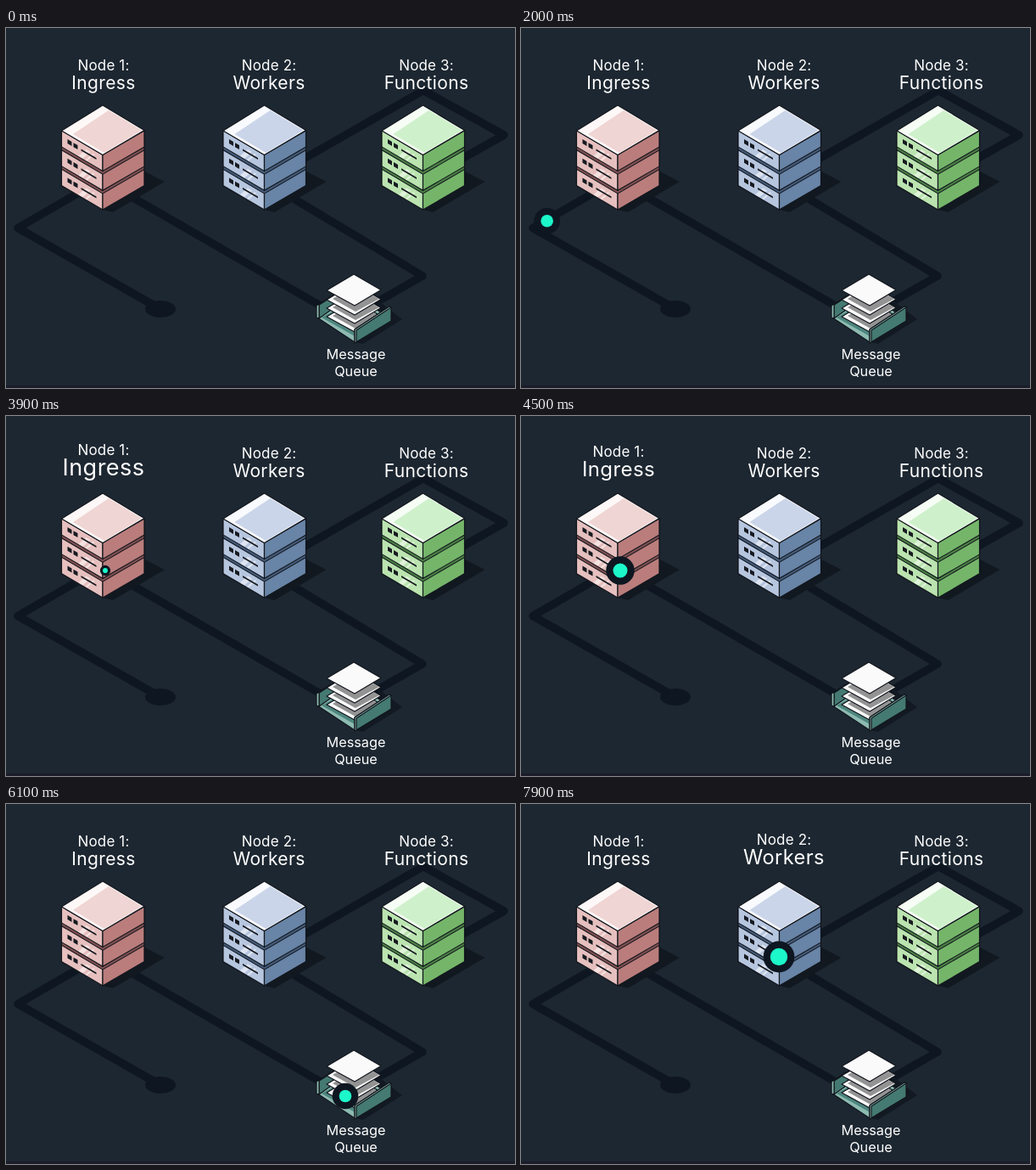
These frames come from a looping animation (600 by 424 pixels, 8 s). An HTML page:

```html
<!DOCTYPE html>
<html lang="en">
<head>
<meta charset="utf-8">
<title>Message flow</title>
<style>
  html, body { margin: 0; width: 100%; height: 100%; overflow: hidden; background: #1d2731; }
  svg { display: block; width: 600px; height: 424px; }
  text { font-family: Inter, "Open Sans", sans-serif; fill: #fff; text-anchor: middle; }
  .small { font-size: 17px; letter-spacing: .15px; }
  .name { font-size: 21px; letter-spacing: .35px; }
  .queue { font-size: 16.3px; }
  .edge { stroke: #11151c; stroke-width: 1.2; stroke-linejoin: round; }
</style>
</head>
<body>
<svg viewBox="0 0 600 424">
  <rect width="600" height="424" fill="#1d2731"/>
  <rect y="421" width="600" height="3" fill="#1b1d2a"/>
  <g fill="none" stroke="#0e1721" stroke-width="9.5" stroke-linejoin="round">
    <path d="M182 331L14 235.500L117 176"/>
    <path d="M117 181L400 344L491 292L304 180"/>
    <path d="M304 181L492 73.500L587 126L491 180"/>
  </g>
  <ellipse cx="182" cy="331" rx="18" ry="10" fill="#0e1721"/>
  <g id="nodes"></g>
  <g id="queue">
    <path d="M440 322L467 343L421 372L411 370Z" fill="#121922"/>
    <g class="edge">
      <path d="M367 341L411 315L453 342L411 370Z" fill="#8dbab1"/>
      <path d="M372 341L411 319L446 341L411 363Z" fill="#4d867e" stroke="none"/>
      <path d="M369 326L386 315L386 330L369 342Z" fill="#447a72"/>
      <path d="M366 327L383 316L386 315L369 326L369 342L366 341Z" fill="#8fbdb4"/>
      <g id="sheets"></g>
      <path d="M411 355L452 328L454 329L454 345L411 371Z" fill="#447a72"/>
      <path d="M411 355L452 328L454 329L413 356L413 370L411 371Z" fill="#8fbdb4"/>
    </g>
  </g>
  <text class="queue" x="412.500" y="390">Message</text>
  <text class="queue" x="412.500" y="410">Queue</text>
  <g id="dot">
    <circle id="halo" fill="#0e1721"/>
    <circle id="core" fill="#1cf8ca"/>
  </g>
</svg>
<script>
const $ = id => document.getElementById(id);
const LOOP = 8000;

const NODES = [
  { x: 114, labelX: 115, name: 'Ingress', top: '#efd5d3', left: '#e6c0bf', right: '#ba7d7c', gap: '#7d4f50', pale: '#fdf8f7' },
  { x: 304.5, labelX: 310, name: 'Workers', top: '#cad5e9', left: '#b7c6df', right: '#6884a6', gap: '#435a78', pale: '#f8fafd' },
  { x: 491.5, labelX: 495.5, name: 'Functions', top: '#cef1cb', left: '#bbe4b0', right: '#75b56a', gap: '#4a7d44', pale: '#f6fdf5' }
];

function slab(n, y) {
  return `
    <g transform="matrix(1 .59 0 1 -48.500 ${y - 28.6})">
      <rect class="edge" width="48.500" height="19" fill="${n.left}"/>
      <path d="M20 18L29 5H34L25 18ZM28 18L37 5H39L30 18Z" fill="${n.pale}" opacity=".6"/>
      <path d="M7 6h5v5h-5zM14 6h5v5h-5zM23 8h18v2h-18z" fill="#171a20"/>
    </g>
    <g transform="matrix(1 -.58 0 1 0 ${y})">
      <rect class="edge" width="49" height="19" fill="${n.right}"/>
    </g>`;
}

function server(n, i) {
  return `
    <g transform="translate(${n.x} 0)">
      <path d="M44 166L73 181L12 217L0 214Z" fill="#111820"/>
      <path class="edge" d="M-48.500 122L0 92L49 121V185L0 214L-48.500 186Z" fill="${n.gap}"/>
      ${[149.5, 172.3, 195].map(y => slab(n, y)).join('')}
      <path class="edge" d="M0 91L49 120.500L0 149.500L-48.500 121Z" fill="${n.pale}"/>
      <path d="M7 97L46 120.500L2 147L-35 125Z" fill="${n.top}"/>
    </g>
    <text class="small" id="title${i}" x="${n.labelX}" y="50">Node ${i + 1}:</text>
    <text class="name" id="name${i}">${n.name}</text>`;
}

$('nodes').innerHTML = NODES.map(server).join('');
$('sheets').innerHTML = [31, 21, 11, 0].map(dy => `
  <g transform="translate(0 ${dy})">
    <path d="M410 290L442 308.500L411 327L378 309Z" fill="#fafafa"/>
    ${dy ? '<path d="M411 293L440 308L412 323L385 308Z" fill="#939393" stroke="none"/>' : ''}
  </g>`).join('');

const clamp = u => Math.max(0, Math.min(1, u));
const smooth = u => u * u * (3 - 2 * u);
const quad = u => u < .5 ? 2 * u * u : 1 - 2 * (1 - u) ** 2;

// Eased value between [time, value] keys.
function keyed(keys, t) {
  const i = keys.findIndex(k => k[0] > t);
  if (i < 0) return keys[keys.length - 1][1];
  if (i === 0) return keys[0][1];
  const [t0, a] = keys[i - 1], [t1, b] = keys[i];
  return a + (b - a) * smooth((t - t0) / (t1 - t0));
}

// Point at a fraction of a polyline's length.
function along(points, u) {
  const spans = points.slice(1).map((p, i) => Math.hypot(p[0] - points[i][0], p[1] - points[i][1]));
  let d = u * spans.reduce((a, b) => a + b);
  let i = 0;
  while (i < spans.length - 1 && d > spans[i]) d -= spans[i++];
  const f = d / spans[i];
  return points[i].map((v, k) => v + (points[i + 1][k] - v) * f);
}

const TRIPS = [
  { from: 1000, to: 2660, path: [[182, 331], [14, 236], [117, 182]] },
  { from: 4600, to: 6100, path: [[117, 182], [400, 344]] },
  { from: 6715, to: 7715, path: [[400, 344], [491, 292], [304, 180]] }
];

const SIZE = [
  [600, 0], [900, 1], [2700, 1], [2900, 1.42], [3300, .4], [4200, .4], [4450, 1.2], [4650, 1],
  [6100, 1], [6350, .4], [6470, .4], [6720, 1], [7720, 1], [7900, 1.4], [8000, 1.42]
];

const GROWTH = [
  [[2700, 0], [3100, 1], [4250, 1], [4750, 0]],
  [[7720, 0], [8120, 1]],
  [[0, 0]]
];

function draw(t) {
  NODES.forEach((n, i) => {
    const p = keyed(GROWTH[i], t);
    $('title' + i).setAttribute('transform', `translate(0 ${-4.5 * p})`);
    $('name' + i).setAttribute('transform', `translate(${n.labelX} ${72 - 2 * p}) scale(${1 + .29 * p})`);
  });
  const trip = TRIPS.filter(s => t >= s.from).pop() || TRIPS[0];
  const [x, y] = along(trip.path, quad(clamp((t - trip.from) / (trip.to - trip.from))));
  const r = 7.3 * keyed(SIZE, t);
  $('dot').setAttribute('transform', `translate(${x} ${y})`);
  $('core').setAttribute('r', r);
  $('halo').setAttribute('r', Math.min(2.1 * r, r + 8.2));
}

const start = performance.now();
function tick() {
  draw((performance.now() - start) % LOOP);
  requestAnimationFrame(tick);
}
tick();
</script>
</body>
</html>
```
